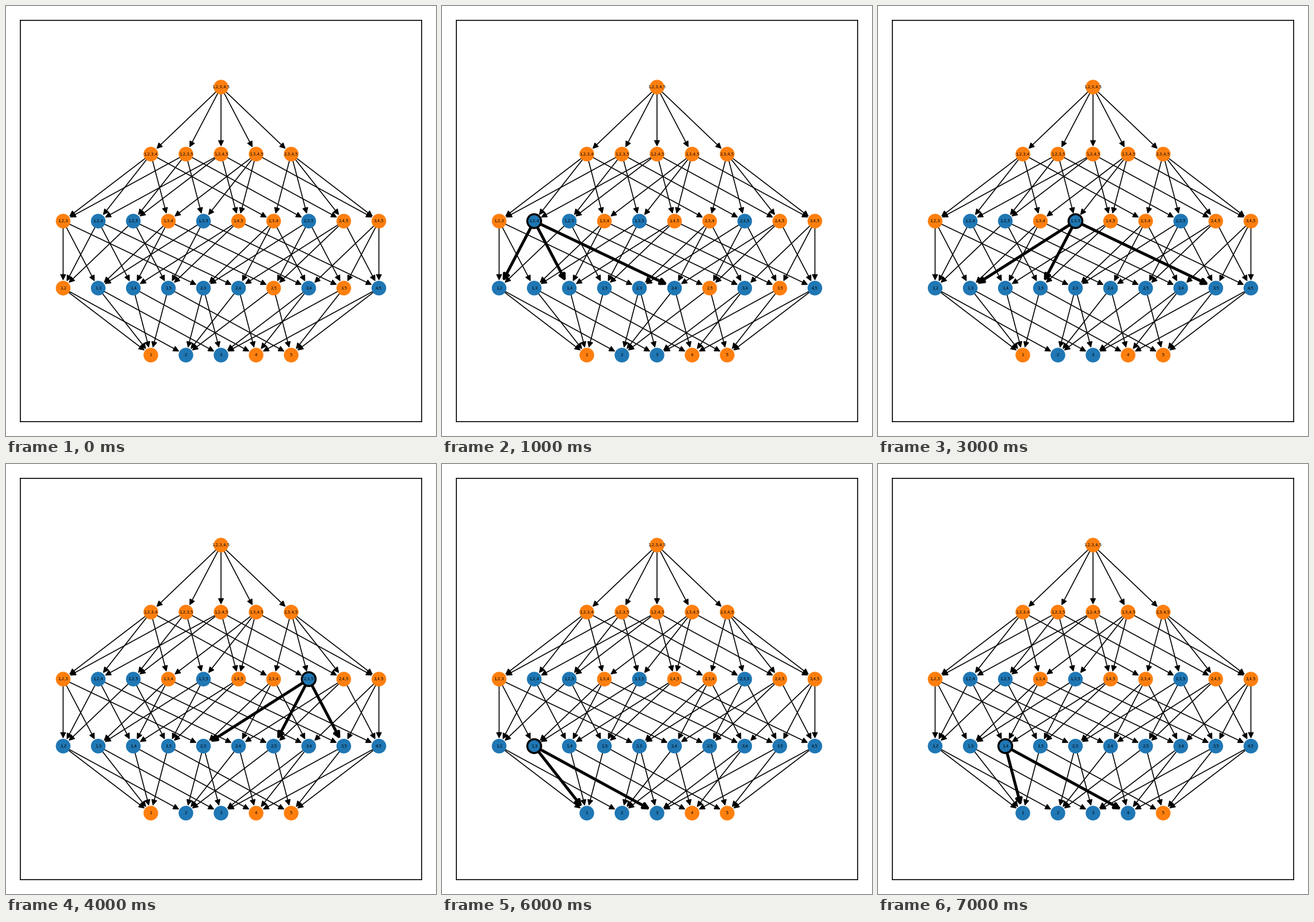
Animation, 748 px wide and 748 px high, one loop 8000 ms. Source, as a matplotlib script:

```python
from itertools import combinations

import matplotlib.pyplot as plt
from matplotlib.animation import FuncAnimation
from matplotlib.patches import FancyArrowPatch

SIZE, DPI, BOX = 748, 100, 698
DX, DY = 61.03, 116.55
THIN, THICK, RING = 1.2, 3.6, 2.5
BLUE, ORANGE = "#1f77b4", "#ff7f0e"

# All non-empty subsets, one row per subset size, largest on top.
pos = {}
for size in range(5, 0, -1):
    row = list(combinations(range(1, 6), size))
    for i, node in enumerate(row):
        pos[node] = ((i - (len(row) - 1) / 2) * DX, (size - 3) * DY)
nodes = list(pos)


def children(node):
    return list(combinations(node, len(node) - 1)) if len(node) > 1 else []


def parse(words):
    return [tuple(map(int, word)) for word in words.split()]


marked = set(parse("124 125 135 235 13 14 15 23 24 34 45 2 3"))
visits = [None] + parse("124 125 135 235 12 13 14")

fig = plt.figure(figsize=(SIZE / DPI, SIZE / DPI), dpi=DPI, facecolor="white")
ax = fig.add_axes([25 / SIZE, 24.8 / SIZE, BOX / SIZE, BOX / SIZE])
ax.set(xlim=(-BOX / 2, BOX / 2), ylim=(-BOX / 2, BOX / 2), xticks=[], yticks=[])
for spine in ax.spines.values():
    spine.set_linewidth(THIN)

arrows = {}
for node in nodes:
    for child in children(node):
        arrow = FancyArrowPatch(pos[node], pos[child], arrowstyle="-|>",
                                mutation_scale=15, shrinkA=8, shrinkB=9.5,
                                color="black", zorder=1)
        arrows[node, child] = ax.add_patch(arrow)

dots = ax.scatter(*zip(*pos.values()), s=300, zorder=2)
for node, (x, y) in pos.items():
    ax.text(x, y, ",".join(map(str, node)), fontsize=5, family="DejaVu Sans",
            ha="center", va="center", zorder=3)


def draw(step):
    current = visits[step]
    # Each visited subset marks its children, and marks accumulate.
    blue = marked.union(*(children(v) for v in visits[1:step + 1]))
    fill = [BLUE if n in blue else ORANGE for n in nodes]
    dots.set_facecolor(fill)
    dots.set_edgecolor(["black" if n == current else c
                        for n, c in zip(nodes, fill)])
    dots.set_linewidth([RING if n == current else 1 for n in nodes])
    for (parent, _), arrow in arrows.items():
        arrow.set_linewidth(THICK if parent == current else THIN)
    return [dots, *arrows.values()]


anim = FuncAnimation(fig, draw, frames=len(visits), interval=1000,
                     repeat=True, repeat_delay=0)
plt.show()
```
